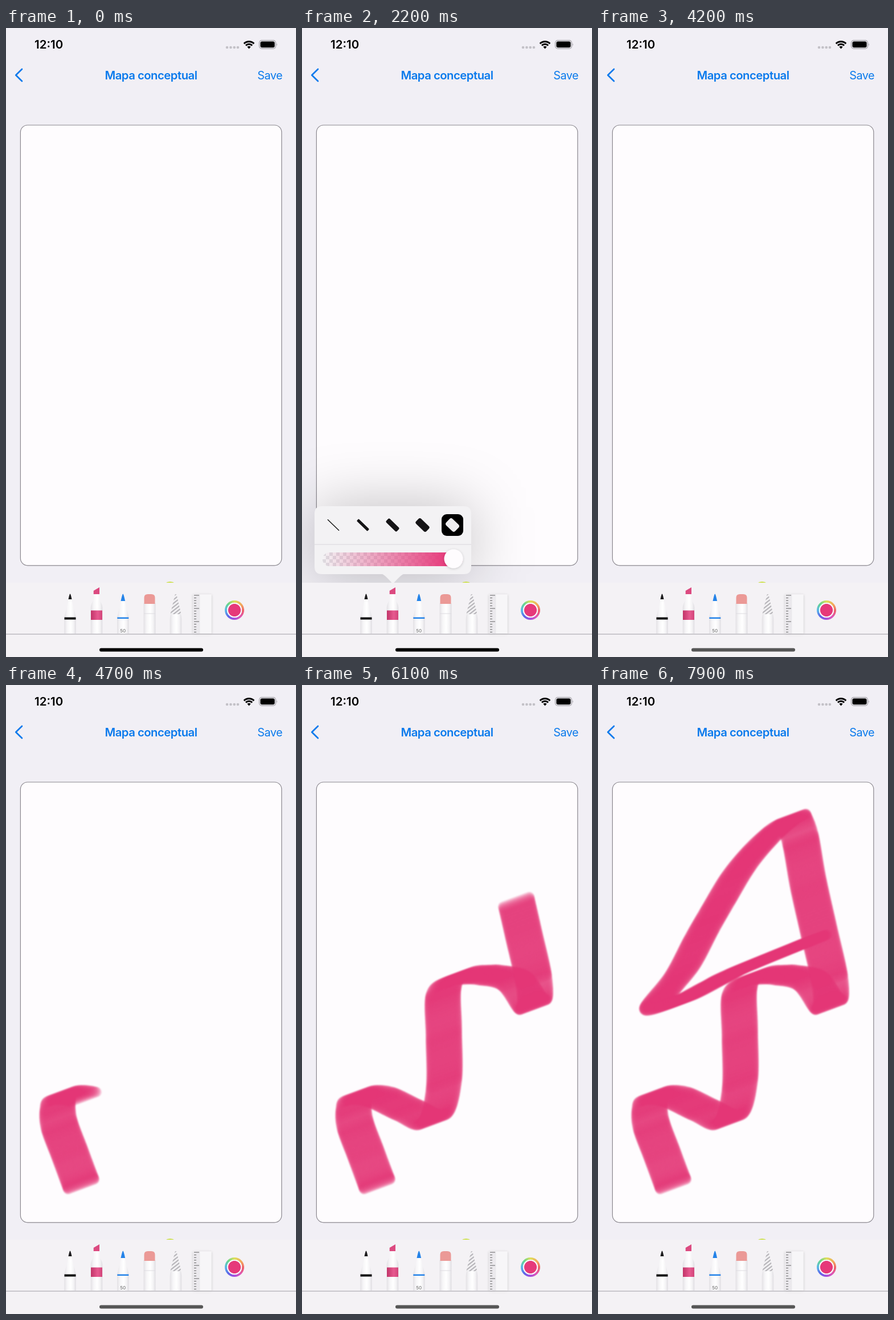
An HTML page with a canvas for the animation above (8 s loop, 509 by 1101 pixels).

```html
<!DOCTYPE html>
<html lang="es">
<head>
<meta charset="utf-8">
<title>Mapa conceptual</title>
<style>
  html, body { margin: 0; width: 100%; height: 100%; overflow: hidden; background: #f1eff5; }
  svg, canvas, #wheel { position: absolute; left: 0; top: 0; }
  canvas { filter: blur(1px); }
  text { font-family: Inter, Roboto, sans-serif; }
  #wheel {
    left: 383.5px; top: 1002px; width: 34px; height: 34px; border-radius: 50%;
    background:
      radial-gradient(circle, #e6397a 10.6px, #f7f5f8 11.4px 13px, transparent 13.6px),
      conic-gradient(#dfe05a, #f3a45c 55deg, #ee5f6c 95deg, #dd55b8 140deg, #a04fe0 185deg,
        #5b66ea 225deg, #57b9e8 270deg, #66d68c 315deg, #dfe05a);
  }
</style>
</head>
<body>
<svg width="509" height="1101" viewBox="0 0 509 1101">
  <defs>
    <linearGradient id="barrel">
      <stop offset="0" stop-color="#e3e1e5"/><stop offset=".25" stop-color="#f6f5f7"/>
      <stop offset=".55" stop-color="#fff"/><stop offset=".8" stop-color="#f4f3f5"/>
      <stop offset="1" stop-color="#dfdde2"/>
    </linearGradient>
    <linearGradient id="band">
      <stop offset="0" stop-color="#c23468"/><stop offset=".6" stop-color="#e75a90"/>
      <stop offset="1" stop-color="#d2457a"/>
    </linearGradient>
    <linearGradient id="fade">
      <stop offset="0" stop-color="#e6397a" stop-opacity="0"/><stop offset=".9" stop-color="#e6397a"/>
    </linearGradient>
    <pattern id="checker" x="36" y="918" width="12" height="12" patternUnits="userSpaceOnUse">
      <path d="M0 0h6v12h6v-6h-12z" fill="#dddbe0"/>
    </pattern>
    <pattern id="hatch" width="5" height="5" patternUnits="userSpaceOnUse" patternTransform="rotate(-38)">
      <path d="M0 1h5" stroke="#b5b3b8" stroke-width="2.2"/>
    </pattern>
    <filter id="glow" x="-100%" y="-200%" width="300%" height="500%"><feGaussianBlur stdDeviation="52"/></filter>
    <filter id="soft" x="-50%" y="-50%" width="200%" height="200%">
      <feDropShadow dx="0" dy="1" stdDeviation="2" flood-opacity=".2"/>
    </filter>
    <path id="pen" d="M-2.5 1000L-9.3 1027Q-10.3 1031-10.3 1035V1060H10.3V1035Q10.3 1031 9.3 1027L2.5 1000z" fill="url(#barrel)"/>
  </defs>

  <!-- status bar -->
  <text x="50" y="36" font-size="20.5" font-weight="600">12:10</text>
  <path d="M388 34h.01m6.4 0h.01m6.3 0h.01m6.2 0h.01" stroke="#c3c1c7" stroke-width="4.6" stroke-linecap="round"/>
  <path d="M417.7 27.4A12.6 12.6 0 0 1 435.3 27.4M420.9 30.6A8 8 0 0 1 432.1 30.6" fill="none" stroke="#000" stroke-width="2.9"/>
  <path d="M426.5 36.4L423.4 33A4.4 4.4 0 0 1 429.6 33z"/>
  <rect x="444.5" y="21.7" width="29" height="14.4" rx="4.5" fill="none" stroke="#a09ea4" stroke-width="1.2"/>
  <rect x="446.4" y="23.6" width="25.2" height="10.6" rx="3"/>
  <path d="M475 26.6q1.8 2.3 0 4.6z" fill="#a09ea4"/>

  <!-- navigation bar -->
  <path d="M28 72L17.3 82.5L28 93" fill="none" stroke="#0a7aec" stroke-width="2.7" stroke-linecap="round" stroke-linejoin="round"/>
  <g fill="#0a7aec" letter-spacing="-.5">
    <text x="254.5" y="90" font-size="20.3" font-weight="600" text-anchor="middle">Mapa conceptual</text>
    <text x="485" y="90" font-size="19.8" text-anchor="end">Save</text>
  </g>

  <rect x="25.4" y="170" width="458.4" height="770.8" rx="12.5" fill="#fefcfe" stroke="#8b888f" stroke-width="1.2"/>
  <rect class="popup" x="22" y="837" width="275" height="119" rx="13" fill-opacity=".25" filter="url(#glow)"/>

  <!-- tool bar -->
  <path d="M279 972Q288 966 297 972z" fill="#cbe046"/>
  <path d="M0 971h509v130H0z" fill="#f4f2f5"/>
  <path d="M0 1061.2h509" stroke="#bebcc1" stroke-width="1.3"/>
  <rect id="home" x="164" y="1085.5" width="182" height="6" rx="3"/>

  <g transform="translate(112.5)">
    <use href="#pen"/>
    <path d="M-3 1000Q-1 990 0 990.5Q1 990 3 1000z" fill="#1c1b1d"/>
    <path d="M-10 1031.5h20v4h-20z" fill="#111"/>
  </g>
  <g transform="translate(159)">
    <path d="M-5.7 990H5.7V1002Q10 1008 10.3 1014V1060H-10.3V1014Q-10 1008-5.7 1002z" fill="url(#barrel)"/>
    <path d="M-5.3 991V985L5 979V991z" fill="#dc4a80"/>
    <path d="M-10 1019.500h20v16.500h-20z" fill="url(#band)"/>
  </g>
  <g transform="translate(205.300)">
    <use href="#pen"/>
    <path d="M-3.800 1003Q-1 990 0 990.500Q1 990 3.800 1003z" fill="#2483e8"/>
    <path d="M-10 1031.500h20v2.500h-20z" fill="#2483e8"/>
    <text y="1057.500" font-size="8" font-weight="500" fill="#777" text-anchor="middle">50</text>
  </g>
  <g transform="translate(252)">
    <path d="M-10.500 1007h21v53h-21z" fill="url(#barrel)"/>
    <path d="M-9.500 1008V997Q-9.500 991-3 991H3Q9.500 991 9.500 997V1008z" fill="#eb9996"/>
    <path d="M-10 1025h20" stroke="#dddbe0"/>
  </g>
  <g transform="translate(298)">
    <use href="#pen"/>
    <path d="M-9.500 1026L-1.500 992Q0 990 1.500 992L9.500 1026z" fill="#f3f2f4"/>
    <path d="M-9.500 1026L-1.500 992Q0 990 1.500 992L9.500 1026z" fill="url(#hatch)"/>
  </g>
  <path d="M328.500 991.500h32v68.500h-32z" fill="#f7f6f8" filter="url(#soft)"/>
  <path d="M328.500 991.500h12v68.500h-12z" fill="#ebe9ed"/>
  <path id="ticks" stroke="#555" stroke-width=".9"/>
  <path d="M0 1061.200h509v2H0z" fill="#f4f2f5"/>
  <path d="M0 1061.200h509" stroke="#bebcc1" stroke-width="1.300"/>

  <!-- nib and opacity popover -->
  <g class="popup">
    <path d="M35 837H284Q297 837 297 850V943Q297 956 284 956H178Q174 957 159.500 973Q145 957 141 956H35Q22 956 22 943V850Q22 837 35 837z" fill="#f3f2f4"/>
    <path d="M22 904h275" stroke="#d8d6db"/>
    <rect x="245" y="851" width="38" height="38" rx="9"/>
    <g id="nibs"></g>
    <rect x="36" y="918" width="246" height="24" rx="12" fill="url(#checker)"/>
    <rect x="36" y="918" width="246" height="24" rx="12" fill="url(#fade)"/>
    <circle cx="266" cy="929" r="16.500" fill="#fefcfe" filter="url(#soft)"/>
  </g>
</svg>
<div id="wheel"></div>
<canvas width="509" height="1101"></canvas>

<script>
const $ = s => document.querySelector(s);
const LOOP = 8000;
const ctx = $('canvas').getContext('2d');

let ticks = '';
for (let i = 0; i < 16; i++) ticks += `M330 ${993 + i * 4.6}h${i % 5 ? 4 : 9}`;
$('#ticks').setAttribute('d', ticks);

// centre x, length, thickness, colour
$('#nibs').innerHTML = [
  [55, 28, 1.4, '#111'], [107, 26, 5, '#151416'], [159, 26, 9, '#151416'],
  [211.5, 25, 12.5, '#151416'], [264, 22, 16, '#eeedef'],
].map(([x, w, h, fill]) =>
  `<rect x="${-w / 2}" y="${-h / 2}" width="${w}" height="${h}" rx="${h / 4}" fill="${fill}" transform="translate(${x} 870) rotate(44)"/>`
).join('');

// centre of the nib and the time it gets there
const knots = [
  [132, 874, 4280], [112, 820, 4400], [93, 768, 4500], [91, 734, 4570], [99, 719, 4610],
  [136, 721, 4700], [188, 745, 4800], [231, 760, 4910], [249, 700, 5050], [249, 610, 5200],
  [249, 534, 5330], [276, 511, 5390], [307, 507, 5450], [332, 508, 5500], [373, 518, 5600],
  [405, 560, 5720], [407, 518, 5830], [388, 432, 6000], [369, 347, 6160], [355, 269, 6300],
  [342, 234, 6400], [342, 234, 6520], [322, 246, 6570], [286, 279, 6650], [247, 326, 6730],
  [209, 389, 6820], [182, 436, 6900], [148, 500, 7050], [104, 558, 7250], [145, 551, 7370],
  [206, 520, 7520], [250, 498, 7630], [380, 445, 7880],
];

function spline(a, b, c, d, u) {
  return b + u * ((c - a) / 2 + u * (a - 2.5 * b + 2 * c - d / 2 + u * (1.5 * (b - c) + (d - a) / 2)));
}

// evenly spaced stamps [x, y, time] along the curve
const stamps = [];
for (let i = 0; i < knots.length - 1; i++) {
  const at = j => knots[Math.max(0, Math.min(knots.length - 1, j))];
  const [a, b, c, d] = [i - 1, i, i + 1, i + 2].map(at);
  const count = Math.round(Math.hypot(c[0] - b[0], c[1] - b[1]) / 1.6);
  for (let k = 0; k < count; k++) {
    const u = k / count;
    stamps.push([spline(a[0], b[0], c[0], d[0], u), spline(a[1], b[1], c[1], d[1], u), b[2] + (c[2] - b[2]) * u]);
  }
}

function drawInk(t) {
  ctx.clearRect(0, 0, 509, 1101);
  ctx.strokeStyle = 'rgba(229,57,121,.22)';
  ctx.lineWidth = 18;
  ctx.lineCap = 'round';
  for (const [x, y, time] of stamps) {
    if (time > t) break;
    ctx.beginPath();
    ctx.moveTo(x - 23, y + 8.5);
    ctx.lineTo(x + 23, y - 8.5);
    ctx.stroke();
  }
}

const ramp = (t, from, to) => Math.max(0, Math.min(1, (t - from) / (to - from)));

function render(t) {
  const shown = t < 2200 ? 0 : 1 - ramp(t, 3100, 3500);
  document.querySelectorAll('.popup').forEach(el => el.setAttribute('opacity', shown));
  const grey = 86 * ramp(t, 3100, 3600);
  $('#home').setAttribute('fill', `rgb(${grey},${grey},${grey})`);
  drawInk(t);
}

let last = -1;
function frame(now) {
  const t = Math.floor(now % LOOP / 100) * 100;
  if (t !== last) render(last = t);
  requestAnimationFrame(frame);
}
render(0);
requestAnimationFrame(frame);
</script>
</body>
</html>
```
